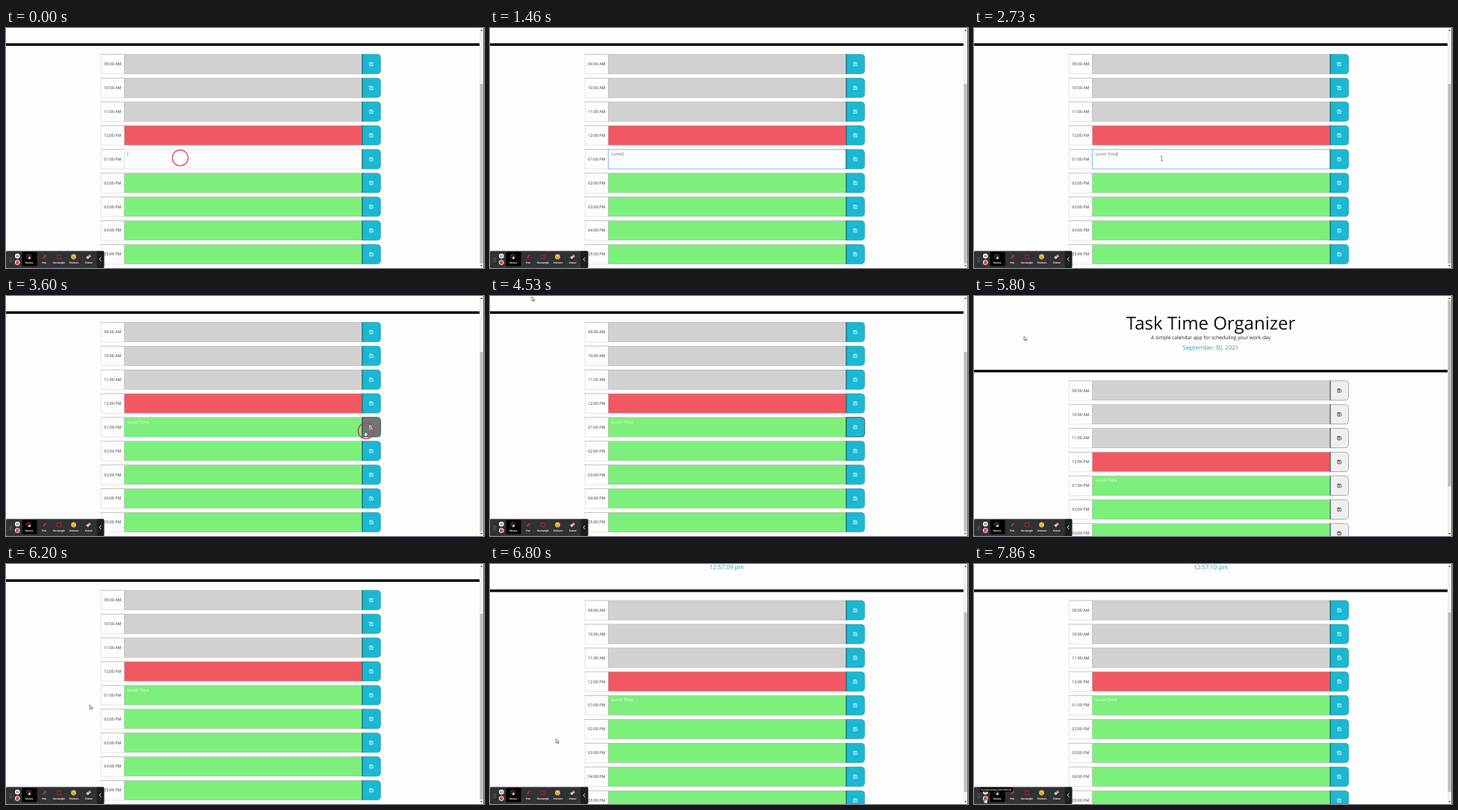
An HTML page for the animation above (7.93 s loop, 640x322 px).

```html
<!DOCTYPE html>
<html lang="en">
<head>
<meta charset="utf-8">
<title>Day planner</title>
<style>
  html, body { margin: 0; width: 100%; height: 100%; overflow: hidden; background: #fdfdfd; }
  svg { display: block; width: 100vw; height: 100vh; }
  text { font-family: "Open Sans", sans-serif; text-rendering: geometricPrecision; white-space: pre; }
</style>
</head>
<body>
<script>
const LOOP = 7930, STEP = 200 / 3;
const CLICK = 3533, RELOAD = 5733, RESTORE = 5865, CLOCK = 6400;
const ROW_TOP = 113.6, PITCH = 31.9, ROW_H = 26.5, CLOCK_LINE = 13.7, MAX_SCROLL = 78.5;
const CYAN = '#1bb8d3', GREEN = '#7cf07a', RED = '#f15861', GREY = '#d1d1d1', WHITE = '#fdfdfd';
const ENTRY = 'Lunch Time', KEY_TIMES = [800, 930, 1065, 1200, 1390, 1860, 2000, 2130, 2265, 2400];

function el(tag, attrs, parent, content) {
  const node = document.createElementNS('http://www.w3.org/2000/svg', tag);
  set(node, attrs);
  if (content) node.textContent = content;
  (parent || document.body).appendChild(node);
  return node;
}
function set(node, attrs) {
  for (const key in attrs) node.setAttribute(key, attrs[key]);
}
const show = (node, on) => set(node, { visibility: on ? 'visible' : 'hidden' });
const rect = (parent, x, y, width, height, fill, more) =>
  el('rect', { x, y, width, height, fill, ...more }, parent);
const path = (parent, d, more) => el('path', { d, fill: 'none', ...more }, parent);
const label = (parent, content, x, y, size, fill, more) =>
  el('text', { x, y, 'font-size': size, fill, 'text-anchor': 'middle', ...more }, parent, content);

const svg = el('svg', { viewBox: '0 0 640 322', preserveAspectRatio: 'none' });
rect(svg, 0, 0, 640, 322, WHITE);

// Page header
const page = el('g', {}, svg);
label(page, 'Task Time Organizer', 317, 45, 24, '#111');
label(page, 'A simple calendar app for scheduling your work day', 317, 58, 6.65, '#222');
const blue = { 'font-weight': 500 };
label(page, 'September 30, 2021', 317, 72, 8, '#1fa5bd', blue);
const clock = label(page, '', 317, 72 + CLOCK_LINE, 8, '#1fa5bd', blue);

// Hour rows
const planner = el('g', {}, page);
rect(planner, 0, 99, 634, 3.4, '#000');
const rows = Array.from({ length: 9 }, (_, i) => {
  const g = el('g', { transform: `translate(0 ${ROW_TOP + i * PITCH})` }, planner);
  const hour = String((i + 8) % 12 + 1).padStart(2, '0') + (i < 3 ? ':00 AM' : ':00 PM');
  path(g, `M127.3 0V${ROW_H}H158`, { stroke: '#d4d4d4', 'stroke-width': .6 });
  path(g, 'M127 .2H158', { stroke: '#555', 'stroke-width': .6, 'stroke-dasharray': '1 .7' });
  label(g, hour, 142.8, 15.1, 5.3, '#333');
  const field = rect(g, 158.3, .2, 318.7, ROW_H - .4, i < 3 ? GREY : i === 3 ? RED : GREEN,
    { stroke: '#aaa', 'stroke-width': .5 });
  const button = path(g, `M477 .2H496.6Q501.6 .2 501.6 5.2V${ROW_H - 5.2}Q501.6 ${ROW_H - .2} 496.6 ${ROW_H - .2}H477Z`,
    { 'stroke-width': .6 });
  path(g, `M477 0V${ROW_H}`, { stroke: '#164b55', 'stroke-width': .8 });
  const icon = path(g, 'M486.8 11H490.4L491.4 12V15.6H486.8ZM487.9 11V12.6H490V11M488.3 14.1H490',
    { 'stroke-width': .65 });
  return { g, field, button, icon };
});
const lunch = rows[4];
const entry = label(lunch.g, '', 162.6, 8.1, 5.3, '#fff', { 'text-anchor': 'start' });
const caret = path(lunch.g, '', { stroke: '#555', 'stroke-width': .5 });

// Scrollbar
rect(svg, 634, 0, 5.4, 322, '#f1f1f1');
const thumb = rect(svg, 634.6, 6, 4, 249, '#bdbdbd');
path(svg, 'M635.2 4L636.7 2L638.2 4ZM635.2 318L636.7 320L638.2 318Z', { fill: '#555' });
rect(svg, 639.2, 0, .8, 322, '#444');

// Recorder toolbar
const bar = el('g', {}, svg);
rect(bar, 0, 299.3, 131.3, 22.7, '#303235', { rx: 1.5, stroke: '#55585b', 'stroke-width': .5 });
rect(bar, 121.5, 299.6, 9.6, 22.2, '#1c1d1f', { rx: 1 });
rect(bar, 21.5, 300.5, 20, 19, '#000', { rx: 1 });
path(bar, 'M5.3 308V314M7 308V314', { stroke: '#999', 'stroke-width': .8, 'stroke-dasharray': '.8 1' });
const dot = (x, y, r, fill) => el('circle', { cx: x, cy: y, r, fill }, bar);
dot(15.3, 306, 3.3, '#fff');
path(bar, 'M14.4 304.6V307.4M16.2 304.6V307.4', { stroke: '#222', 'stroke-width': .8 });
dot(15.3, 314.6, 3.3, '#fff');
rect(bar, 13, 312.3, 4.6, 4.6, '#e34655', { rx: 1.3 });
['Mouse', 'Pen', 'Rectangle', 'Stickers', 'Eraser'].forEach((name, i) =>
  label(bar, name, 31.2 + i * 19.95, 315.5, 3.2, '#fff', { 'font-weight': 700 }));
el('circle', { cx: 30.5, cy: 306.5, r: 2.7, fill: 'none', stroke: '#e06a72', 'stroke-width': .7 }, bar);
path(bar, 'M30.5 305.8V310.5L31.7 309.4L33.6 309.3Z', { fill: '#fff' });
path(bar, 'M49 309.5L50 306.5L53 304L54 305.5L51.5 308.7Z', { fill: '#d3202d' });
rect(bar, 68.2, 304.6, 5.6, 4.8, 'none', { stroke: '#b51f2a', 'stroke-width': .9 });
dot(90.5, 307, 3.4, '#f6c443');
path(bar, 'M88.8 306.2H89.8M91.2 306.2H92.2M88.8 308Q90.5 309.7 92.2 308', { stroke: '#6b4310', 'stroke-width': .6 });
path(bar, 'M107.5 307.6L112 304L114 306.2L109.5 309.8Z', { fill: '#ee9aa5' });
path(bar, 'M107.5 307.6L109 306.4L111 308.6L109.5 309.8Z', { fill: '#fff' });
path(bar, 'M127.2 307.8L125.2 310.3L127.2 312.8', { stroke: '#fff', 'stroke-width': .9 });
const tooltip = el('g', {}, bar);
rect(tooltip, 8, 299.8, 44, 5.8, '#050505', { rx: .8 });
label(tooltip, 'End Recording (Alt+Shift+R)', 30, 303.9, 3.1, '#fff', { 'font-weight': 600 });

// Pointer
const ring = el('circle', { r: 10.6, fill: 'none', stroke: '#e0566c', 'stroke-width': 1.4 }, svg);
const ink = { fill: '#fff', stroke: '#333', 'stroke-width': .6 };
const pointers = {
  arrow: path(svg, 'M0 0V5.6L1.4 4.4L2.4 6.4L3.3 6L2.4 4H4.2Z', ink),
  hand: path(svg, 'M-.6 0Q0 -.7 .6 0V2.3L3 3V5.3L2.3 7H-.7L-2.4 4.3L-1.7 3.7L-.6 4.5Z', ink),
  beam: path(svg, 'M-1.2 -3H1.2M0 -3V3M-1.2 3H1.2', { stroke: '#444', 'stroke-width': .6 })
};
const ROUTE = [
  [2660, 233, 174], [2930, 300, 178], [3330, 476, 182], [3467, 481, 181], [3733, 481, 181],
  [4000, 380, 126], [4267, 170, 55], [4533, 56, 1], [4667, 50, -10], [5530, 62, -10],
  [5800, 67, 54], [6000, 92, 130], [6200, 112, 189], [6660, 104, 210], [7000, 66, 270],
  [7330, 17, 313], [7860, 15, 314]
];

function along(route, t) {
  let i = route.findIndex(p => p[0] > t);
  if (i < 0) return route[route.length - 1].slice(1);
  if (i === 0) return route[0].slice(1);
  const [a, b] = [route[i - 1], route[i]];
  const k = (t - a[0]) / (b[0] - a[0]);
  return [a[1] + (b[1] - a[1]) * k, a[2] + (b[2] - a[2]) * k];
}

function drawPage(t) {
  const reloaded = t >= RELOAD;
  const extra = !reloaded || t >= CLOCK ? CLOCK_LINE : 0;
  const scroll = !reloaded ? MAX_SCROLL + CLOCK_LINE : t < RESTORE ? 0 : MAX_SCROLL;
  const height = 322 + MAX_SCROLL + extra;
  set(page, { transform: `translate(0 ${-scroll})` });
  set(planner, { transform: `translate(0 ${extra})` });
  set(thumb, { y: 6 + 310 * scroll / height, height: 310 * 322 / height });
  clock.textContent = t < CLOCK ? '' : t < CLOCK + 1000 ? '12:57:09 pm' : '12:57:10 pm';
}

function drawRows(t, x) {
  const fresh = t >= RELOAD && t < RESTORE;
  const hovered = t > 2660 && t < 4200 && x > 477;
  rows.forEach(row => {
    const hover = row === lunch && hovered;
    const focus = row === lunch && t > CLICK && t < RELOAD;
    set(row.button, {
      fill: fresh ? '#efefef' : hover ? '#70757a' : CYAN,
      stroke: fresh ? '#777' : focus ? '#52666b' : '#2c8b9b',
      'stroke-width': focus ? 1.1 : .6
    });
    set(row.icon, { stroke: fresh ? '#222' : '#fff' });
  });

  const editing = t < CLICK;
  const focusLine = t >= 200 && t < 3660;
  set(lunch.field, {
    fill: editing ? WHITE : GREEN,
    stroke: focusLine ? (editing ? '#70b2ed' : '#8fd8d5') : editing ? '#ccc' : '#aaa',
    'stroke-width': focusLine ? .9 : .5
  });
  entry.textContent = ENTRY.slice(0, KEY_TIMES.filter(k => k <= t).length);
  set(entry, { fill: editing ? '#666' : '#fff' });
  const end = 162.6 + entry.getComputedTextLength() + .4;
  set(caret, { d: `M${end} 3V9.3` });
  show(caret, editing && (t < 2930 || t > 3460));
}

function drawPointer(t, [x, y]) {
  const kind = t < 2660 ? '' : t < 4200 && x > 477 || t >= 7330 ? 'hand'
    : t < 4200 && x > 158 && y > 162 ? 'beam' : 'arrow';
  for (const name in pointers) {
    show(pointers[name], name === kind);
    set(pointers[name], { transform: `translate(${x} ${y})` });
  }
  const second = t >= CLICK;
  set(ring, { cx: second ? 482 : 233.3, cy: second ? 181 : 174.3, stroke: second ? '#bd3f50' : '#e0566c' });
  show(ring, t < 330 || second && t < 3800);
  show(tooltip, t >= 7330);
}

function render(now) {
  const time = now % LOOP;
  const t = Math.floor((time + 8) / STEP) * STEP;
  const spot = along(ROUTE, t);
  drawPage(t);
  drawRows(t, spot[0]);
  drawPointer(t, spot);
}

const start = performance.now();
function tick() {
  render(performance.now() - start);
  requestAnimationFrame(tick);
}
tick();
</script>
</body>
</html>
```
